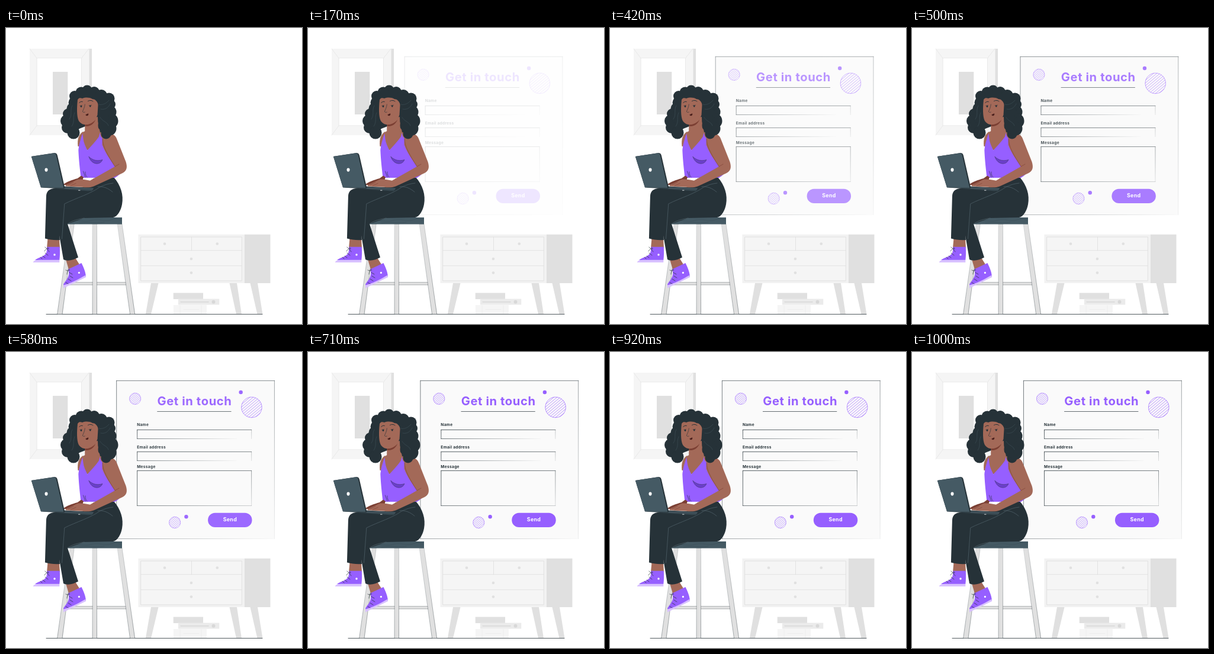
An HTML page with a canvas for the animation above (1040 ms loop, 500x500 px).

```html
<!DOCTYPE html>
<html lang="en">
<head>
<meta charset="utf-8">
<title>Get in touch</title>
<style>
html, body { margin: 0; width: 100%; height: 100%; overflow: hidden; background: #fff; }
canvas { position: absolute; left: 0; top: 0; width: 500px; height: 500px; }
</style>
</head>
<body>
<canvas id="room"></canvas>
<canvas id="form"></canvas>
<canvas id="woman"></canvas>
<script>
const LOOP = 1040, STEP = 41.6;
const INK = '#263238', SLATE = '#455a64', PURPLE = '#965fff', SKIN = '#a36958', SHADE = '#7b3f33';
const PALE = '#f5f5f5', MID = '#ebebeb', GREY = '#e0e0e0';
const ratio = window.devicePixelRatio || 1;
let c;

function layer(id) {
  const el = document.getElementById(id);
  el.width = el.height = 500 * ratio;
  const ctx = el.getContext('2d');
  ctx.scale(ratio, ratio);
  ctx.lineCap = ctx.lineJoin = 'round';
  return ctx;
}

function shape(d, fill, stroke, width = 0.6) {
  const p = new Path2D(d);
  if (fill) { c.fillStyle = fill; c.fill(p); }
  if (stroke) { c.strokeStyle = stroke; c.lineWidth = width; c.stroke(p); }
}
const line = (d, color, width) => shape(d, null, color, width);

function box(x, y, x2, y2, fill, stroke, width) {
  shape(`M${x} ${y}H${x2}V${y2}H${x}Z`, fill, stroke, width);
}

function dot(x, y, rx, fill, ry = rx) {
  c.beginPath();
  c.ellipse(x, y, rx, ry, 0, 0, 7);
  c.fillStyle = fill;
  c.fill();
}

// Ink that fades from one strength to another
function fade(x, y, x2, y2, from, to) {
  const g = c.createLinearGradient(x, y, x2, y2);
  g.addColorStop(0, `rgba(38,50,56,${from})`);
  g.addColorStop(1, `rgba(38,50,56,${to})`);
  return g;
}

function edge(x, y, x2, y2, from, to, width = 0.8) {
  line(`M${x} ${y}L${x2} ${y2}`, fade(x, y, x2, y2, from, to), width);
}

function text(str, x, y, size, color, spacing, align = 'left') {
  c.font = `700 ${size}px Inter, "Open Sans", sans-serif`;
  c.letterSpacing = spacing + 'px';
  c.textAlign = align;
  c.fillStyle = color;
  c.fillText(str, x, y);
}

function hatch(x, y, r, gap, width) {
  c.save();
  c.translate(x, y);
  c.rotate(-0.7);
  c.beginPath();
  c.arc(0, 0, r, 0, 7);
  c.strokeStyle = PURPLE;
  c.lineWidth = width;
  c.stroke();
  for (let k = -r + gap * 0.7; k < r; k += gap) {
    const w = Math.sqrt(r * r - k * k);
    line(`M${-w} ${k}H${w}`, PURPLE, width);
  }
  c.restore();
}

function drawRoom() {
  // picture on the wall
  box(139, 35, 145, 181, GREY);
  box(40, 35, 140.5, 181, PALE);
  line('M40 35L52 51M140 35L127.5 51M40 181L52 165M140 181L127.5 165', GREY, 0.6);
  box(52.5, 50.8, 127.5, 164.8, '#fff', GREY, 0.6);
  box(79, 74, 104.3, 146, GREY);

  // sideboard
  shape('M245 431H257.5L245 483.5H235.8ZM377.5 431H390L398 483.5H389ZM412.5 431H425L433.5 483.5H424.5Z', GREY);
  box(223.5, 348.7, 403, 431, '#f2f2f2');
  box(403, 348.7, 446.5, 431, GREY);
  box(228, 353, 398.3, 427, PALE, GREY, 1);
  line('M228 375.8H398M228 401.7H398M313.5 353V375.8', GREY, 0.9);
  for (const [x, y] of [[268, 364.5], [356.8, 364.5], [313, 390], [313, 413.5]]) dot(x, y, 2.3, GREY);

  // books
  box(282.7, 447.5, 333, 458, GREY);
  box(291, 457.6, 360.3, 467.6, MID);
  line('M295 462.7H342', '#d8d8d8', 1.5);
  dot(350.5, 462.7, 2.9, '#d8d8d8');
  box(283, 468, 339, 483, PALE);
  line('M300 475.5H326M294 469V483M330 469V483', MID, 0.8);
}

function drawField(top, bottom, label, base) {
  const l = 223.5, r = 416.5;
  text(label, 223, base, 6.6, INK, 0.3);
  edge(l, top, r, top, 0.95, 0.75);
  edge(l, top, l, bottom, 0.95, 0.8);
  const tall = bottom - top > 30;
  edge(r, top, r, bottom, tall ? 0.7 : 0.4, 0.2, 0.7);
  edge(l, bottom, tall ? r : r - 25, bottom, 0.8, tall ? 0.3 : 0.03);
}

function drawForm() {
  box(188.5, 48.5, 455.5, 315.5, '#fafafa');
  edge(188.5, 48.5, 455.5, 48.5, 0.75, 0.7);
  edge(188.5, 48.5, 188.5, 315.5, 0.8, 0.6);
  edge(455.3, 48.5, 455.3, 315.5, 0.65, 0.1, 0.7);
  edge(188.5, 315.5, 455.5, 315.5, 0.55, 0.02);

  text('Get in touch', 320.3, 90, 20.2, PURPLE, 0.6, 'center');
  line('M257.5 100.5H382', INK, 0.7);
  drawField(131.5, 146.5, 'Name', 125.3);
  drawField(168.6, 183.6, 'Email address', 162.6);
  drawField(200.5, 259.6, 'Message', 195.6);

  hatch(220, 78.9, 9.6, 2.5, 0.5);
  hatch(416.8, 93.4, 17.3, 3.5, 0.6);
  hatch(287, 288, 9.6, 2.5, 0.5);
  dot(398.5, 68, 3.2, PURPLE);
  dot(306.3, 278.3, 3.2, PURPLE);
  shape('M355 271.8H405.3a12.1 12.1 0 0 1 0 24.2H355a12.1 12.1 0 0 1 0 -24.2Z', PURPLE);
  text('Send', 380.2, 286.3, 8.9, '#fff', 0.3, 'center');
}

function drawStool() {
  line('M68 483.5H433', INK, 0.8);
  const ink = fade(0, 331, 0, 484, 0.35, 0.85);
  box(100, 429.5, 205, 434, GREY, ink, 0.45);
  shape('M108.5 331H115.3L95 483.5H87Z', GREY, ink, 0.5);
  shape('M188.5 331H196L217.7 483.5H210Z', GREY, ink, 0.5);
  box(146.5, 331, 153.5, 483.5, GREY, ink, 0.5);
  box(104, 320, 196, 331.4, SLATE);
  line('M106 327C120 322 131 329 144 325S166 328 178 324S190 326 195 324M124 330C139 326 151 331 166 328', '#3a4d56', 0.5);
}

function drawLegs() {
  // ankles
  shape('M101 391L117 388L125 401L106 408Z', SKIN);
  shape('M70.5 355H90L91 372H69Z', SKIN);

  // shoes
  shape('M105 407.5L127.5 397C131 404 134.5 412 135 420L98 437L97 433C101 426 109 420 105 407.5Z', PURPLE);
  shape('M97 434.5C109 431.5 122 424.5 134.5 417.5L135 421L97 439.5Z', '#d8c1ff');
  dot(123.4, 413.4, 1.6, '#fff');
  shape('M69.3 369.7H90.7C91.4 377 91.2 385 90.3 392H49C54 387.5 64 387 68 380C69 377 69.4 373 69.3 369.7Z', PURPLE);
  shape('M46 395C49 391.6 53 391.6 58 391.8H90.3V396H46Z', '#d8c1ff');
  dot(82, 383, 1.7, '#fff');
  line('M66 370C68 374 73 374 72 372S66 375 65 377M70 374L73 378M66 380L71 384M62 385L66 388M58 387L61 390', INK, 0.7);
  line('M101 409C104 411 109 410 107 408S103 413 103 416M107 413L112 416M108 419L113 422M105 424L110 427M101 430L105 432', INK, 0.7);

  // trousers
  shape('M90 350L97 391C104 394.5 114 392 122 387.5L104 331L132 321L181 320C189 318 194 308 196 298C199 282 194 266 182 252L148 254L138 269L84 270.5C73 271 68 276 67.9 285L65.9 355.5C74 358 83 358.5 91 358Z', INK);
  line('M94.5 356L98.8 297C119 287 143 280 158 269C165 265 173 263 181 262M155 268C165 267 173 271 180 277M104 331C109 327 116 324 132 321', '#5a6c75', 0.6);
}

function drawTorso() {
  shape('M130 175C123 180 120 187 121.5 200L130 200Z', SKIN);
  shape('M133.5 155V174L128 177L124 206H163L165 182L159 174L157 150Z', SKIN);
  shape('M129.3 178C126 188 123 197 122.3 206C123 224 125 239 126.5 253H184C189 250 193 247 195 242L166 190L160 183L158.5 177L157 183.5C151 192 144 199 137.5 206.5C134 200 131 193 130.5 187Z', PURPLE);
  shape('M140 217.5C147 224 155 225 163 222.5C159 233 144 231 140 217.5Z', '#6b3fca', INK, 0.4);
  line('M130.5 242L134 252M134 243C133.5 247 135 250 137 252', INK, 0.6);
}

function drawLaptop() {
  shape('M96 265C103 259 111 257 121 254L127 249.5L131 252L129 258L113 266Z', SHADE);
  shape('M58 269.3L99 267.5L148.3 270L145.5 275.3C134 275.7 115 273 58 269.3Z', '#37474f');
  shape('M42.8 217L82 211C85 210.8 86.3 213 87 216L99.5 270.8L59 269.3Z', INK);
  shape('M42.8 217L81 211.2C83 211 84.3 213 85 216L97.3 270L59 269.3Z', SLATE);
  dot(68, 239.6, 2.5, '#fff', 3.1);
  line('M99 270.5L147 272', '#607580', 0.5);
  line('M122.5 274.2H125', '#fff', 0.8);
}

function drawArm() {
  shape('M163 181C173 176 184 178 187 187L202.5 226C205.5 236 204 241.5 196 245.5L148 267.5C143 269.5 136 269.7 129 268.8L101 267.3C100 265.5 103 264 108 262L121 255.8C128 255 135 256.5 142 257.8L184 234C176 222 167 210 162.5 197Z', SKIN);
  line('M163 187C163 200 172 215 184 234L191 230M105 265L114 260.5M109 266.5L118 262.5', SHADE, 0.6);
}

function drawHead() {
  const curls = [
    [137, 105, 8.5], [127, 109, 9.5], [149, 108, 9], [161, 114, 10], [116, 115, 9],
    [174, 119, 9.5], [115, 126, 9.5], [176, 129, 9], [112, 136, 9.5], [175, 142, 11.5],
    [105, 145, 9], [176, 157, 13.5], [102.5, 157, 10.5], [175, 170, 11.5], [104, 168, 10],
    [169, 179, 8.5], [114, 177, 10.5], [163, 165, 8], [117, 150, 13], [166, 145, 12]
  ];
  for (const [x, y, r] of curls) dot(x, y, r, INK);
  shape('M116 112L160 112L176 130L170 180L159 176L155 158L124 170L112 182L108 140Z', INK);

  // neck shows between the two sides of the hair
  shape('M133.5 155V180H156L155 150Z', SKIN);
  shape('M133 163C141 163.5 147 160 151 155C149 161 143 167 133.8 165.8Z', SHADE);
  shape('M121 121C119.5 135 119.5 149 122.5 156C126 162.5 133 164.8 140 162C147 159.5 152 154 154.5 147L156 122L147 115H126Z', SKIN);
  shape('M119 125C120 119 124 117 129 119C134 117 141 117 146 120C150 120 154 123 156 130L161 120L150 109H124Z', INK);

  // features
  line('M123.7 126.3C125.5 124.3 127.5 124 129.3 124.6M138.5 123.5C141.5 121.8 144.5 122 147 124', INK, 1);
  dot(127, 132.4, 1.3, INK, 1.6);
  dot(142.3, 132, 1.3, INK, 1.6);
  line('M124.8 131.5L128.5 130.8M140 131L144.5 130.3', INK, 0.6);
  line('M133.3 129C133 134 130.5 138 129.3 141.2C130.5 143 132 142.7 133.3 142', INK, 0.6);
  shape('M134.3 146.8C136 145 138 145.2 139 144.2C139.8 146 139 148 137.3 148.3C136 148.4 135 147.8 134.3 146.8Z', '#4a1f1c');
  line('M157 129C163 131 170 127 174 122M160 137C168 139 174 133 176 128M159 151C164 159 171 158 173 165M112 131C107 139 113 145 107 154M116 143C112 151 117 158 111 166', '#45575f', 0.5);
}

// Easing with a slight overshoot, cubic-bezier(.36, -.01, .5, 1.38)
function ease(t) {
  if (t >= 1) return 1;
  const curve = (s, a, b) => 3 * a * s * (1 - s) ** 2 + 3 * b * s * s * (1 - s) + s ** 3;
  let lo = 0, hi = 1;
  for (let i = 0; i < 30; i++) {
    const m = (lo + hi) / 2;
    if (curve(m, 0.36, 0.5) < t) lo = m; else hi = m;
  }
  return curve(lo, -0.01, 1.38);
}

c = layer('room');
drawRoom();
const form = layer('form');
c = layer('woman');
drawStool();
drawLegs();
drawTorso();
drawLaptop();
drawArm();
drawHead();

const start = performance.now();
function frame() {
  const t = Math.max(0, performance.now() - start) % LOOP;
  const step = Math.floor((t + 3) / STEP) % 25;
  const p = ease((step * STEP + 40) / 1000);
  c = form;
  c.clearRect(0, 0, 500, 500);
  c.save();
  c.translate(30 * (p - 1), 0);
  drawForm();
  c.restore();
  c.canvas.style.opacity = step ? Math.min(1, Math.max(0, p)) : 0;
  requestAnimationFrame(frame);
}
frame();
</script>
</body>
</html>
```
